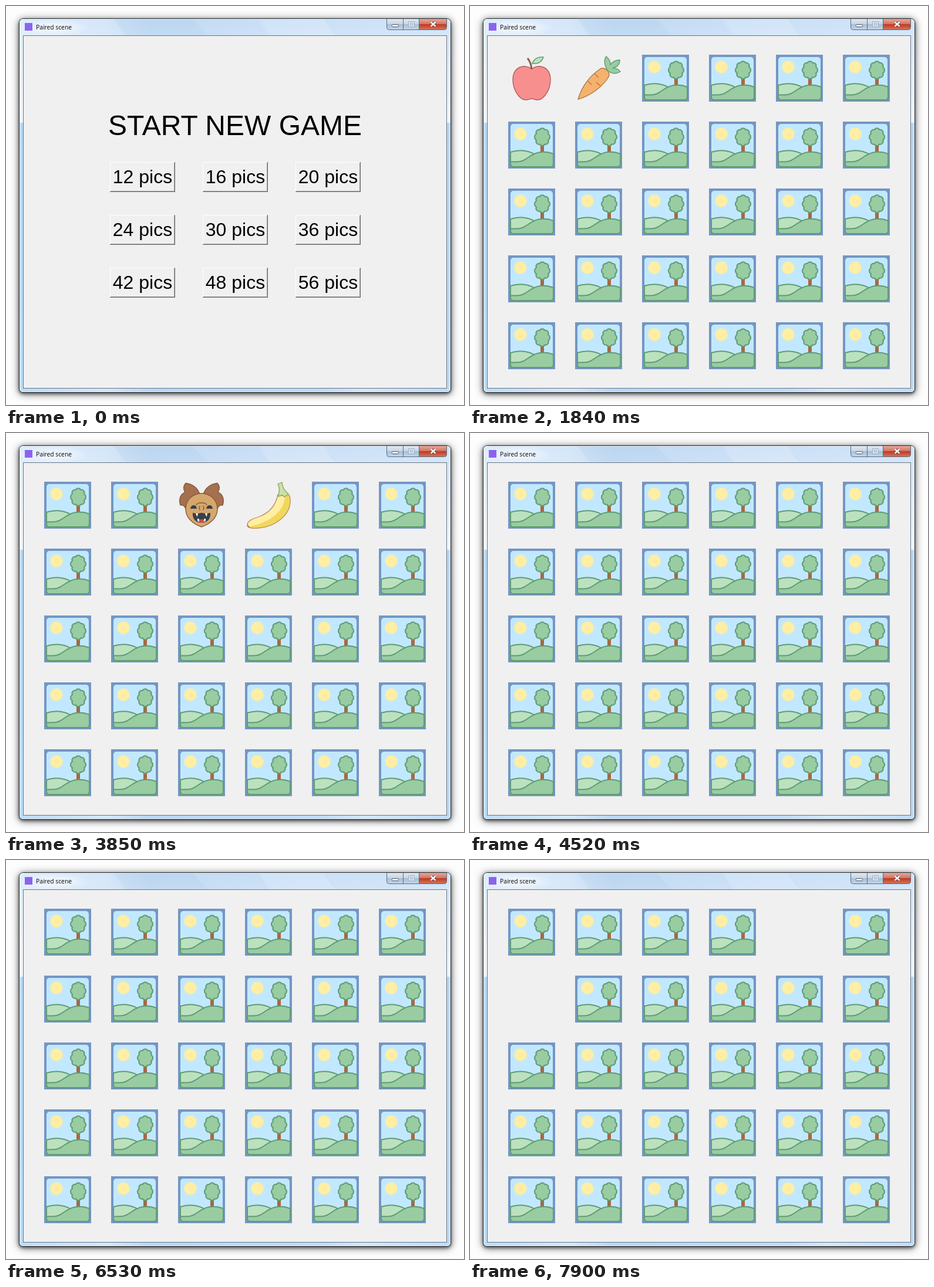
An HTML page for the animation above (8 s loop, 780 by 680 pixels).

```html
<!DOCTYPE html>
<html lang="en">
<head>
<meta charset="utf-8">
<title>Paired scene</title>
<style>
html, body { margin: 0; width: 100%; height: 100%; overflow: hidden; background: #fdfdfd; }
.window {
  position: absolute; left: 23px; top: 22px; width: 734px; height: 636px;
  border-radius: 7px 7px 6px 6px;
  box-shadow: 0 0 0 1px #23292f, 0 2px 5px 1px rgba(0,0,0,.5), 0 2px 13px 2px rgba(0,0,0,.5);
}
svg { position: absolute; left: 0; top: 0; display: block; }
text { font-kerning: none; }
.caption { font: 10.3px "Open Sans", "Noto Sans", sans-serif; }
.heading { font: 48px "Liberation Sans", Arial, sans-serif; text-anchor: middle; }
.labels { font: 32px "Liberation Sans", Arial, sans-serif; text-anchor: middle; }
.leaf { fill: #9acca1; stroke: #5e9c76; stroke-width: 2; stroke-linejoin: round; }

.menu, .board, .face, .gap { animation: 8s step-end infinite; }
.board, .face, .gap { opacity: 0; }
.menu { animation-name: menu; }
.board { animation-name: board; }
.c0 { animation-name: c0; }
.c1 { animation-name: c1; }
.c2 { animation-name: c2; }
.c3 { animation-name: c3; }
.c4 { animation-name: c4; }
.c5 { animation-name: c5; }
.c6 { animation-name: c6; }
.gap { animation-name: gap; }
@keyframes menu { 0% { opacity: 1 } 6.25%, 100% { opacity: 0 } }
@keyframes board { 0% { opacity: 0 } 6.25%, 100% { opacity: 1 } }
@keyframes c0 { 0%, 31.375%, 100% { opacity: 0 } 14.625% { opacity: 1 } }
@keyframes c1 { 0%, 31.375%, 100% { opacity: 0 } 23% { opacity: 1 } }
@keyframes c2 { 0%, 56.5%, 100% { opacity: 0 } 39.75% { opacity: 1 } }
@keyframes c3 { 0%, 56.5%, 100% { opacity: 0 } 48.125% { opacity: 1 } }
@keyframes c4 { 0%, 81.625%, 100% { opacity: 0 } 64.875% { opacity: 1 } }
@keyframes c5 { 0%, 81.625%, 100% { opacity: 0 } 73.25% { opacity: 1 } }
@keyframes c6 { 0%, 98.75%, 100% { opacity: 0 } 90% { opacity: 1 } }
@keyframes gap { 0% { opacity: 0 } 98.75%, 100% { opacity: 1 } }
</style>
</head>
<body>
<div class="window"></div>
<svg width="780" height="680" viewBox="0 0 780 680">
<defs>
  <linearGradient id="glass">
    <stop offset="0" stop-color="#d9eafb"/><stop offset=".2" stop-color="#cfe3f8"/>
    <stop offset=".3" stop-color="#bad5f1"/><stop offset=".65" stop-color="#c3dcf6"/>
    <stop offset="1" stop-color="#cbe1f8"/>
  </linearGradient>
  <linearGradient id="sheen" x2="0" y2="1">
    <stop offset="0" stop-color="#fff" stop-opacity=".1"/><stop offset="1" stop-color="#fff" stop-opacity=".75"/>
  </linearGradient>
  <linearGradient id="side" x2="0" y2="1">
    <stop offset="0" stop-color="#b8d8f5"/><stop offset="1" stop-color="#bddcf8"/>
  </linearGradient>
  <linearGradient id="foot">
    <stop offset="0" stop-color="#bddcf8"/><stop offset=".2" stop-color="#d3e8fb"/>
    <stop offset=".3" stop-color="#b9d8f5"/><stop offset=".7" stop-color="#bfdcf8"/>
    <stop offset=".8" stop-color="#d3e8fb"/><stop offset="1" stop-color="#bddcf8"/>
  </linearGradient>
  <linearGradient id="grey" x2="0" y2="1">
    <stop offset="0" stop-color="#dfe9f4"/><stop offset=".48" stop-color="#c7d5e5"/>
    <stop offset=".5" stop-color="#a9bdd3"/><stop offset="1" stop-color="#c3d6ea"/>
  </linearGradient>
  <linearGradient id="red" x2="0" y2="1">
    <stop offset="0" stop-color="#e6a99b"/><stop offset=".48" stop-color="#d3715f"/>
    <stop offset=".5" stop-color="#b93a25"/><stop offset="1" stop-color="#d5765a"/>
  </linearGradient>
  <radialGradient id="glow">
    <stop offset="0" stop-color="#fff" stop-opacity=".75"/><stop offset="1" stop-color="#fff" stop-opacity="0"/>
  </radialGradient>

  <g id="button" shape-rendering="crispEdges">
    <path d="M0 0H111V51H0Z" fill="#696969"/>
    <path d="M0 0H110V50H0Z" fill="#fff"/>
    <path d="M1 1H110V50H1Z" fill="#a0a0a0"/>
    <path d="M1 1H109V49H1Z" fill="#f0f0f0"/>
  </g>
  <g id="buttons">
    <use href="#button" x="177"/><use href="#button" x="335"/><use href="#button" x="493"/>
  </g>

  <g id="tile">
    <rect width="80" height="80" fill="#7496c4"/>
    <rect x="4" y="4" width="72" height="72" rx="5" fill="#c2e8ff"/>
    <circle cx="21" cy="21" r="10.7" fill="#ffeea3"/>
    <path d="M55 38H61V54H55Z" fill="#a9683f"/>
    <path class="leaf" transform="translate(58 26.2)" d="M-4.2-12.3A4.6 4.6 0 0 1 4.2-12.3A5 5 0 0 1 10-5.2A6 6 0 0 1 10 5.2A5 5 0 0 1 4.2 12.3A4.6 4.6 0 0 1-4.2 12.3A5 5 0 0 1-10 5.2A6 6 0 0 1-10-5.2A5 5 0 0 1-4.2-12.3Z"/>
    <path class="leaf" style="fill:#bce1be" d="M4 52C17 48 32 48 46 56L28 70H4Z"/>
    <path class="leaf" d="M4 68.5H15C31 68.5 35 56 52 52.5C62 50.8 70 52 77 55V72Q77 77 72 77H9Q4 77 4 72Z"/>
  </g>
  <g id="row">
    <use href="#tile"/><use href="#tile" x="114"/><use href="#tile" x="228"/>
    <use href="#tile" x="342"/><use href="#tile" x="456"/><use href="#tile" x="570"/>
  </g>
  <rect id="blank" width="80" height="80" fill="#f0f0f0"/>

  <g id="apple" stroke-width="1.4" stroke-linejoin="round">
    <path d="M40 24C28 15 8 20 8 43C8 61 20 77 30 77C35 77 37 75 40 75S45 77 50 77C60 77 72 61 72 43C72 20 52 15 40 24Z" fill="#f78f8f" stroke="#b45f5f"/>
    <path d="M40 25Q39 13 33 6" fill="none" stroke="#8b5f44" stroke-width="3"/>
    <path d="M41 15Q45 3 60 4Q56 17 41 15Z" fill="#bce1be" stroke="#5e9c76"/>
  </g>
  <g id="carrot" stroke-width="1.4" stroke-linejoin="round">
    <path d="M54 25Q47 11 53 3Q60 8 60 17Q66 9 76 9Q76 20 64 23Q72 22 77 29Q67 35 56 28Z" fill="#9acca1" stroke="#5e9c76"/>
    <path d="M43 24C51 20 61 30 57 38C47 54 27 70 5 76C11 54 26 35 43 24Z" fill="#f5b16d" stroke="#b07a45"/>
    <path d="M33 32L40 39M43 53L36 47M22 45L28 51" fill="none" stroke="#b07a45"/>
  </g>

  <path id="wing" d="M13 2.5C24 4 34 10 37 22L22 31L17 45Q15 48 14 49C13 44 11 42 8 40L4 40C1 31 3 22 12 18C9 13 9 7 13 2.5Z" fill="#a5704d" stroke="#86593f" stroke-width="1.4" stroke-linejoin="round"/>
  <g id="bat">
    <use href="#wing"/><use href="#wing" transform="matrix(-1 0 0 1 80 0)"/>
    <path d="M40 20C56 20 67 32 67 47C67 62 54 72 40 77C26 72 13 62 13 47C13 32 24 20 40 20Z" fill="#d6a76c" stroke="#86593f" stroke-width="1.4"/>
    <path d="M21 46Q22 40 27 40Q31 40 32 46ZM48 46Q49 40 54 40Q58 40 59 46Z" fill="#36404d"/>
    <path d="M31 40Q32 36 40 36T49 40M37 41Q35 48 38 48M43 41Q45 48 42 48" fill="none" stroke="#86593f" stroke-width="1.4"/>
    <path d="M25 53Q32 55 40 53Q48 55 55 53C56 64 49 70 40 70S24 64 25 53Z" fill="#36404d"/>
    <path d="M33 68Q40 60 47 68Q40 72 33 68Z" fill="#c8523c"/>
    <path d="M30 54H34L32.5 60ZM46 54H50L48.5 60ZM33 63H36V68L33 67ZM44 63H47V67L44 68Z" fill="#fff"/>
  </g>

  <g id="banana" stroke-linejoin="round">
    <path d="M56 22C52 42 40 54 23 60C13 63 3 67 4 75C5 79 14 80 23 79C52 77 79 56 77 30C77 25 75 22 72 20Z" fill="#ffeea3"/>
    <path d="M72 20L68 26C66 52 41 70 6 77C10 80 17 80 23 79C52 77 79 56 77 30C77 25 75 22 72 20Z" fill="#f2d75d"/>
    <path d="M56 22C52 42 40 54 23 60C13 63 3 67 4 75C5 79 14 80 23 79C52 77 79 56 77 30C77 25 75 22 72 20Z" fill="none" stroke="#b89158" stroke-width="1.3"/>
    <path d="M56 4L63 1C64 10 67 15 74 21L67 26L64 23L56 25C59 18 59 10 56 4Z" fill="#cce2a4" stroke="#899f64" stroke-width="1.3"/>
    <path d="M4 72L8 78Q4 78 4 72Z" fill="#a06d47"/>
  </g>

  <g id="burger" stroke-width="1.2" stroke-linejoin="round">
    <path d="M1 24C1 11 18 5.6 40 5.6S79 11 79 24Z" fill="#f5ce85" stroke="#b08a55"/>
    <path d="M23 13.5h.1M30 11.5h.1M32 16h.1" stroke="#a06d47" stroke-width="2.4" stroke-linecap="round"/>
    <path d="M.6 24H79.4V39H.6Z" fill="#f98f90" stroke="#c06a68"/>
    <path d="M.6 24H79.4V32Q72 30 66 34Q60 36 54 31Q49 25 43 31Q37 37 30 32Q23 29 16 33Q8 35 .6 32Z" fill="#bce1be" stroke="#5e9c76" stroke-width="1"/>
    <path d="M3 39H77L79 46H1Z" fill="#ffeea3" stroke="#c9a95f"/>
    <path d="M.6 55H79.4V66Q79.4 72.4 73 72.4H7Q.6 72.4 .6 66Z" fill="#f5ce85" stroke="#b08a55"/>
    <path d="M.6 55H79.4V62Q71 61 65 62Q57 66 49 62Q41 60 35 62Q25 67 17 63Q9 59 .6 61Z" fill="#bce1be" stroke="#5e9c76" stroke-width="1"/>
    <path d="M.6 45.6H79.4V55H.6Z" fill="#a06d47" stroke="#86593f"/>
  </g>

  <g id="bear" stroke-width="1.3" stroke-linejoin="round">
    <g fill="#a5704d" stroke="#86593f"><circle cx="13.5" cy="15" r="10.7"/><circle cx="66.5" cy="15" r="10.7"/></g>
    <path d="M25 11.5C32 10 37 11 40 14C43 11 48 10 55 11.5C67 18 79 37 79.4 56C77 67 59 73 40 73S3 67 .6 56C1 37 13 18 25 11.5Z" fill="#d6a76c" stroke="#96704a"/>
    <circle cx="27.5" cy="31.5" r="4.3" fill="#36404d"/><circle cx="52.5" cy="31.5" r="4.3" fill="#36404d"/>
    <path d="M30 42H50C57 44 62 51 62 58C62 69 52 75.5 40 75.5S18 69 18 58C18 51 23 44 30 42Z" fill="#f5ce85" stroke="#96704a"/>
    <path d="M28 42H52Q49 51 40 55Q31 51 28 42Z" fill="#806056"/>
    <path d="M40 60Q42 65 48 67H32Q38 65 40 60Z" fill="#86593f"/>
  </g>

  <clipPath id="frame"><rect x="23" y="22" width="734" height="636" rx="6"/></clipPath>
</defs>

<g clip-path="url(#frame)">
  <rect x="23" y="22" width="734" height="177" fill="url(#glass)"/>
  <path d="M183 22H318L345 51H205Z" fill="#a4c6e8" opacity=".3"/>
  <path d="M430 22H540L560 51H450Z" fill="#fff" opacity=".15"/>
  <rect x="23" y="22" width="734" height="177" fill="url(#sheen)"/>
  <ellipse cx="82" cy="37" rx="62" ry="15" fill="url(#glow)"/>
  <rect x="23" y="199" width="734" height="459" fill="url(#side)"/>
  <rect x="23" y="651" width="734" height="7" fill="url(#foot)"/>
</g>
<rect x="23.5" y="22.5" width="733" height="635" rx="6" fill="none" stroke="#fff" stroke-opacity=".7"/>

<rect x="32" y="29" width="13" height="13" fill="#8b63f0"/>
<text class="caption" x="51" y="40">Paired scene</text>

<path d="M648.5 22V36.5Q648.5 40.5 652.5 40.5H703.5V22Z" fill="url(#grey)"/>
<path d="M703.5 22V40.5H746.5Q750.5 40.5 750.5 36.5V22Z" fill="url(#red)"/>
<path d="M648.5 22V36.5Q648.5 40.5 652.5 40.5H746.5Q750.5 40.5 750.5 36.5V22M676.5 22V40M703.5 22V40" fill="none" stroke="#566b83"/>
<rect x="657.5" y="31.5" width="11" height="4" rx="1" fill="#fff" stroke="#4c5667"/>
<path d="M685.5 26.5H695.5V35.5H685.5ZM688.5 29.5H692.5V32.5H688.5Z" fill="#d7e2ee" stroke="#9fb0c3"/>
<path d="M724 28L731 34M731 28L724 34" stroke="#5c3a40" stroke-width="4.4"/>
<path d="M723.6 27.6L731.4 34.4M731.4 27.6L723.6 34.4" stroke="#fff" stroke-width="2.6"/>

<rect x="29.5" y="50.5" width="721" height="601" fill="#f0f0f0" stroke="#677584"/>

<g class="menu">
  <text class="heading" x="390" y="220">START NEW GAME</text>
  <use href="#buttons" y="266"/><use href="#buttons" y="356"/><use href="#buttons" y="446"/>
  <g class="labels">
    <text x="232.5" y="302">12 pics</text><text x="390.5" y="302">16 pics</text><text x="548.5" y="302">20 pics</text>
    <text x="232.5" y="392">24 pics</text><text x="390.5" y="392">30 pics</text><text x="548.5" y="392">36 pics</text>
    <text x="232.5" y="482">42 pics</text><text x="390.5" y="482">48 pics</text><text x="548.5" y="482">56 pics</text>
  </g>
</g>

<g class="board">
  <g transform="translate(65 83)">
    <use href="#row"/><use href="#row" y="114"/><use href="#row" y="228"/>
    <use href="#row" y="342"/><use href="#row" y="456"/>
    <g class="face c0"><use href="#blank"/><use href="#apple"/></g>
    <g class="face c1"><use href="#blank" x="114"/><use href="#carrot" x="114"/></g>
    <g class="face c2"><use href="#blank" x="228"/><use href="#bat" x="228"/></g>
    <g class="face c3"><use href="#blank" x="342"/><use href="#banana" x="342"/></g>
    <g class="face c4"><use href="#blank" x="456"/><use href="#burger" x="456"/></g>
    <g class="face c5"><use href="#blank" x="570"/><use href="#bear" x="570"/></g>
    <g class="face c6"><use href="#blank" y="114"/><use href="#burger" y="114"/></g>
    <g class="gap"><use href="#blank" x="456"/><use href="#blank" y="114"/></g>
  </g>
</g>
</svg>
</body>
</html>
```
